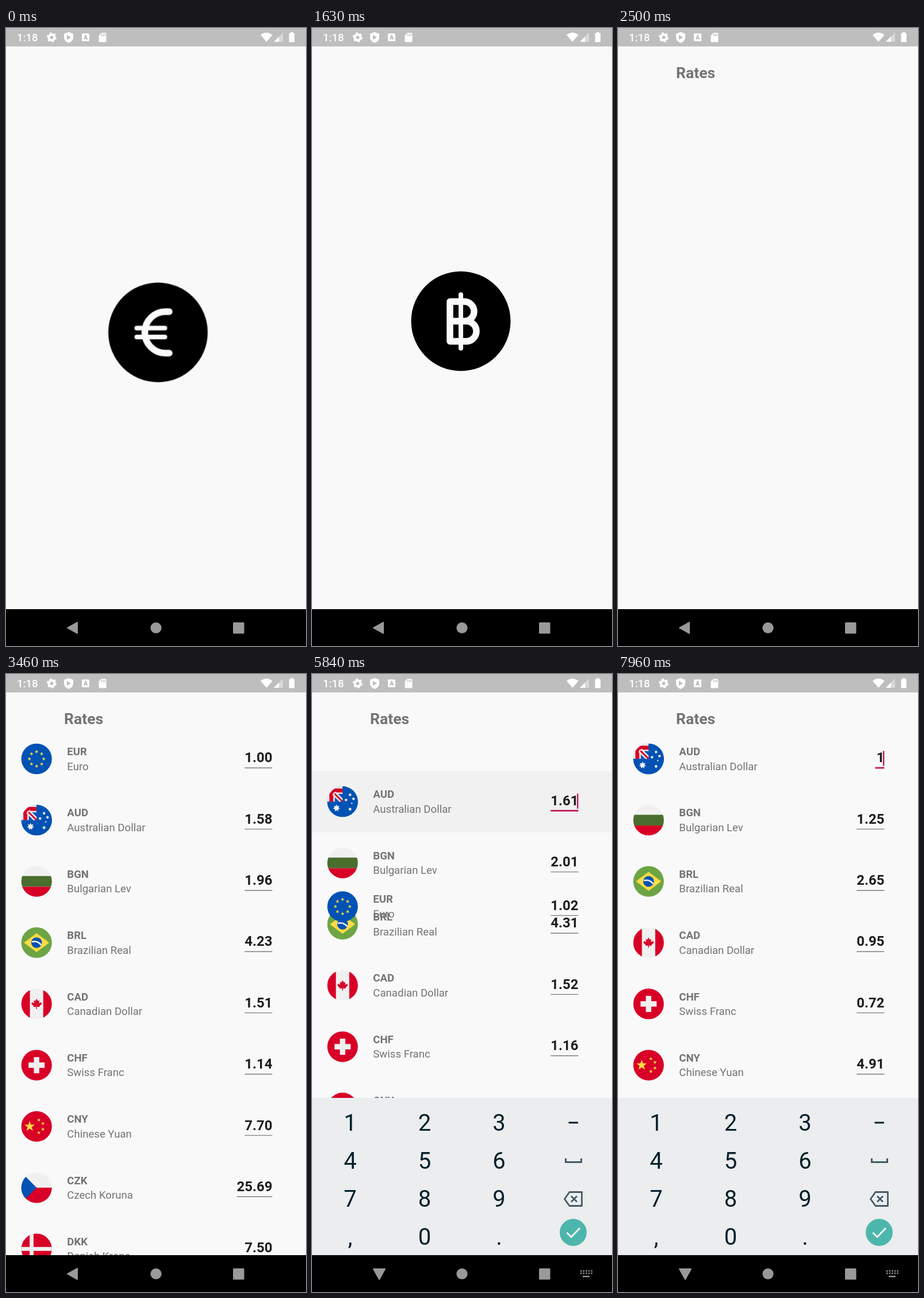
Write an HTML page that moves like this. It is 522 px wide and 1073 px high and loops after 8000 ms.

```html
<!DOCTYPE html>
<html lang="en">
<head>
<meta charset="utf-8">
<title>Currency rates</title>
<style>
html, body { margin: 0; width: 100%; height: 100%; overflow: hidden; background: #000; }
#stage { position: relative; width: 522px; height: 1073px; overflow: hidden; background: #000; }
.layer, .layer > svg { position: absolute; left: 0; top: 0; width: 522px; height: 1073px; }
#imeArea { height: 1009px; overflow: hidden; }
text { font-family: Roboto, sans-serif; }

.anim { animation: 8s linear infinite; }
#splash { animation-name: leave; }
#dim { animation-name: dim; }
#coin { animation-name: drift; }
#face { animation-name: flip; }
#euro { animation-name: first; }
#dollar { animation-name: second; }
#baht { animation-name: third; }
#main { animation-name: enter, reveal; }
#list { animation-name: appear; }
.row { animation-name: shift; }
#ripple { animation-name: ripple; }
#ime { animation-name: raise; }
#navBack { animation-name: navBack; }
#navIme { animation-name: navIme; }
#euro, #dollar, #baht, #navBack, #navIme { animation-timing-function: step-end; }

@keyframes leave {
  0%, 23.575% { transform: none; animation-timing-function: cubic-bezier(.4,0,.2,1); }
  28.575%, 100% { transform: translateY(-21.5px); }
}
@keyframes dim { 0%, 23.575% { opacity: 0; } 24.8%, 100% { opacity: .1; } }
@keyframes drift {
  0% { transform: translate(264.5px, 528.5px); animation-timing-function: ease-in-out; }
  20.375%, 100% { transform: translate(259px, 509px); }
}
@keyframes flip {
  0%, 4.875%, 11.75% { transform: scaleX(1); animation-timing-function: ease-in; }
  6.75%, 13.625% { transform: scaleX(0); animation-timing-function: ease-out; }
  8.625%, 15.5%, 100% { transform: scaleX(1); }
}
@keyframes first { 0% { opacity: 1; } 6.75%, 100% { opacity: 0; } }
@keyframes second { 0% { opacity: 0; } 6.75% { opacity: 1; } 13.625%, 100% { opacity: 0; } }
@keyframes third { 0% { opacity: 0; } 13.625%, 100% { opacity: 1; } }
@keyframes enter {
  0%, 23.575% { transform: translateY(44px); animation-timing-function: cubic-bezier(.4,0,.2,1); }
  28.575%, 100% { transform: none; }
}
@keyframes reveal {
  0%, 23.574% { clip-path: inset(100% 0 0 0); }
  23.575% { clip-path: inset(95.9% 0 0 0); animation-timing-function: cubic-bezier(.3,0,.8,.15); }
  24.408% { clip-path: inset(57.54% 0 0 0); animation-timing-function: cubic-bezier(.05,.7,.1,1); }
  28.575%, 100% { clip-path: inset(0 0 0 0); }
}
@keyframes appear { 0%, 31.875% { opacity: 0; } 33.1%, 100% { opacity: 1; } }
@keyframes shift {
  0%, 71.875% { transform: translateY(var(--from)); animation-timing-function: cubic-bezier(.37,0,.63,1); }
  74.94%, 100% { transform: translateY(var(--to)); }
}
@keyframes ripple {
  0%, 65.63% { opacity: 0; }
  67.5%, 73.2% { opacity: .032; }
  75.5%, 100% { opacity: 0; }
}
@keyframes raise {
  0%, 67.5% { transform: translateY(60px); opacity: 0; animation-timing-function: ease-out; }
  69.5%, 100% { transform: none; opacity: 1; }
}
@keyframes navBack { 0% { opacity: 1; } 67.5%, 100% { opacity: 0; } }
@keyframes navIme { 0% { opacity: 0; } 67.5%, 100% { opacity: 1; } }

#face path { fill: none; stroke: #fafafa; stroke-linecap: round; stroke-linejoin: round; }
.thick { stroke-width: 11.5; }
.thin { stroke-width: 8; }
.label { fill: #737373; font-size: 18.6px; }
.code { font-weight: 700; }
.rate { fill: #1c1c1c; font-size: 23.93px; font-weight: 700; text-anchor: end; }
.rule { stroke: #7d7c84; stroke-width: 1.4; }
.focus .rule { stroke: #c2185b; stroke-width: 2.7; }
.key { fill: #06202b; font-size: 40px; text-anchor: middle; }
</style>
</head>
<body>
<div id="stage">
  <div class="layer"><svg fill="#999">
    <path id="navBack" class="anim" d="M107 1041.5 124 1032V1051Z" stroke="#999" stroke-width="2" stroke-linejoin="round"/>
    <circle cx="261" cy="1041.5" r="9.6"/>
    <rect x="395" y="1032" width="19.5" height="19.5" rx="1.5"/>
    <g id="navIme" class="anim">
      <path d="M107 1033H127L117 1051Z" stroke="#999" stroke-width="2" stroke-linejoin="round"/>
      <path d="M467 1036.5H488M467 1040.5H488" stroke="#999" stroke-width="2.4" stroke-dasharray="2.4 2.2"/>
      <path d="M471 1046H483" stroke="#999" stroke-width="2.4"/>
    </g>
  </svg></div>

  <div id="splash" class="layer anim"><svg>
    <rect width="522" height="1009" fill="#f9f9fa"/>
    <rect width="522" height="32" fill="#bebebe"/>
    <g id="coin" class="anim"><g id="face" class="anim">
      <circle r="86.5"/>
      <g id="euro" class="anim">
        <path class="thick" d="M19.5-36H13A36 36 0 0 0 13 36H19.5"/>
        <path class="thin" d="M-37-7.5H12M-37 8H12"/>
      </g>
      <g id="dollar" class="anim">
        <path class="thick" d="M23-20C19-40-22-40-22-18C-22 4 24-4 24 18C24 40-20 40-24 20"/>
        <path class="thin" d="M0-47V47"/>
      </g>
      <g id="baht" class="anim">
        <path class="thick" d="M-19-34H6A17 17 0 0 1 6 0H9.500A17.500 17.500 0 0 1 9.500 35H-19ZM-19 0H9"/>
        <path class="thin" d="M0-46V47"/>
      </g>
    </g></g>
    <rect id="dim" class="anim" width="522" height="1009"/>
  </svg></div>

  <div id="main" class="layer anim"><svg>
    <clipPath id="page"><rect width="522" height="1009"/></clipPath>
    <clipPath id="disc"><circle r="26.6"/></clipPath>
    <g clip-path="url(#page)">
      <rect width="522" height="1009" fill="#f9f9fa"/>
      <text x="101" y="87" font-size="26.6" font-weight="700" fill="#737373">Rates</text>
      <g id="list" class="anim"></g>
      <rect width="522" height="32" fill="#bebebe"/>
    </g>
  </svg></div>

  <div id="imeArea" class="layer"><svg>
    <g id="ime" class="anim">
      <rect y="736" width="522" height="273" fill="#ebedee"/>
      <g id="keys"></g>
      <g fill="none" stroke="#455a64" stroke-width="3">
        <path d="M446.500 779H463" stroke="#06202b"/>
        <path d="M441.500 841V847.500H468.500V841"/>
        <path d="M448 899.500H469.500V923.500H448L439.500 911.500ZM451 906.500 461 916.500M461 906.500 451 916.500" stroke-width="2.8" stroke-linejoin="round"/>
      </g>
      <circle cx="454.500" cy="969.500" r="23.500" fill="#4db6ac"/>
      <path d="M443.500 970 451 977.500 466 962" fill="none" stroke="#fff" stroke-width="2.8"/>
    </g>
  </svg></div>

  <div class="layer"><svg fill="#fff">
    <text x="19" y="23" font-size="18.600" font-weight="500">1:18</text>
    <g fill="none" stroke="#fff">
      <circle cx="79.500" cy="16.300" r="4.900" stroke-width="4"/>
      <circle cx="79.500" cy="16.300" r="7.300" stroke-width="2.600" stroke-dasharray="3.800 3.845"/>
    </g>
    <path fill-rule="evenodd" d="M109 7 117 10V16C117 21 113.500 24.500 109 26C104.500 24.500 101 21 101 16V10ZM106 12V20.500L113 16.200Z"/>
    <rect x="132" y="9.500" width="13" height="13.500" rx="1.500"/>
    <text x="138.500" y="20" font-size="10" font-weight="700" text-anchor="middle" fill="#aaa">A</text>
    <path d="M166 8.500H173Q174.500 8.500 174.500 10V23Q174.500 24.500 173 24.500H163Q161.500 24.500 161.500 23V13Z"/>
    <path d="M166.500 10.500V14M169.500 10.500V14M172.200 10.500V14" stroke="#bebebe" stroke-width="1.500"/>
    <path d="M443 12Q453 4 463.500 12L453.200 24Z"/>
    <path d="M482 8V24H466Z" opacity=".4"/>
    <path d="M475 15V24H466Z"/>
    <path d="M495 7H499.500V9H502V24.500H492.500V9H495Z"/>
  </svg></div>
</div>

<script>
const LOOP = 8000, ROW = 106.35, TOP = 147.4, RIGHT = 463.4;
const BLUE = '#0052b4', RED = '#d80027', WHITE = '#f0f0f0', GOLD = '#ffda44';

const box = (x, y, w, h, fill) => `<rect x="${x}" y="${y}" width="${w}" height="${h}" fill="${fill}"/>`;
const full = fill => box(-27, -27, 54, 54, fill);
const path = (d, fill) => `<path d="${d}" fill="${fill}"/>`;
const star = (x, y, r, fill, tips = 5) => {
  const points = Array.from({ length: tips * 2 }, (_, k) => {
    const a = k * Math.PI / tips, q = k % 2 ? r * (tips > 5 ? .55 : .4) : r;
    return `${(x + q * Math.sin(a)).toFixed(2)},${(y - q * Math.cos(a)).toFixed(2)}`;
  });
  return `<polygon points="${points.join(' ')}" fill="${fill}"/>`;
};
const ring = Array.from({ length: 8 }, (_, k) =>
  star(12.5 * Math.sin(k * Math.PI / 4), -12.5 * Math.cos(k * Math.PI / 4), 3.4, GOLD)).join('');
const halfLeaf = 'M0-9 2.500-5 5-6 4-1 8-3 9 0 5 4 5 5.500 .8 5V9H0Z';

const currencies = [
  ['EUR', 'Euro', full(BLUE) + ring],
  ['AUD', 'Australian Dollar', full(BLUE) + box(-27, -27, 27, 27, WHITE) +
    path('M-23 0V-23H0V-16H-16V0Z', RED) + box(-13.5, -13.5, 13.5, 13.5, BLUE) +
    `<path d="M-15-15 1 1" stroke="${WHITE}" stroke-width="8"/><path d="M-14-14 0 0" stroke="${RED}" stroke-width="3"/>` +
    box(0, -27, 27, 54, BLUE) + box(-27, 0, 27, 27, BLUE) +
    star(-10.5, 11, 6.3, WHITE, 7) + star(13, -12, 3, WHITE, 7) + star(6, -3, 3, WHITE, 7) +
    star(19, -5, 3, WHITE, 7) + star(13, 13, 3.2, WHITE, 7) + star(16, 3, 2, WHITE)],
  ['BGN', 'Bulgarian Lev', full(WHITE) + box(-27, -9.3, 54, 18.6, '#496e2d') + box(-27, 9.3, 54, 18, RED)],
  ['BRL', 'Brazilian Real', full('#6da544') + path('M-22 0 0-16.500 22 0 0 16.500Z', GOLD) +
    `<circle r="9.3" fill="${BLUE}"/><path d="M-8.500-1.500Q2-4 8 4" fill="none" stroke="${WHITE}" stroke-width="2.6"/>`],
  ['CAD', 'Canadian Dollar', full(WHITE) + box(-27, -27, 15.4, 54, RED) + box(11.6, -27, 15.4, 54, RED) +
    path(halfLeaf, RED) + `<g transform="scale(-1 1)">${path(halfLeaf, RED)}</g>`],
  ['CHF', 'Swiss Franc', full(RED) + box(-14, -4.7, 28, 9.4, WHITE) + box(-4.7, -14, 9.4, 28, WHITE)],
  ['CNY', 'Chinese Yuan', full(RED) + star(-12, 0, 9.5, GOLD) +
    [[4, -11], [11, -5], [11, 5], [4, 11]].map(([x, y]) => star(x, y, 3.4, GOLD)).join('')],
  ['CZK', 'Czech Koruna', full(WHITE) + box(-27, 0, 54, 27, RED) + path('M-27-27-19-19 0 0-19 19-27 27Z', BLUE)],
  ['DKK', 'Danish Krone', full(RED) + box(-12, -27, 6.7, 54, WHITE) + box(-27, -3.4, 54, 6.8, WHITE)]
];

// Start time and the rates shown from then on, in list order
const updates = [
  [0, '1.00 1.59 1.96 4.24 1.52 1.14 7.73 25.74 7.48'],
  [3380, '1.00 1.58 1.96 4.23 1.51 1.14 7.70 25.69 7.50'],
  [4210, '1.00 1.59 1.96 4.26 1.51 1.13 7.68 25.87 7.47'],
  [5000, '1.00 1.60 1.96 4.25 1.50 1.14 7.66 26.02 7.46'],
  [5750, '1.02 1.61 2.01 4.31 1.52 1.16 7.91 26.30 7.61'],
  [6600, '1.02 1.6 2.00 4.24 1.52 1.15 7.86 26.12 7.55'],
  [6980, '0.64 1. 1.25 2.66 0.95 0.72 4.92 16.30 4.72'],
  [7560, '0.64 1 1.25 2.65 0.95 0.72 4.91 16.28 4.71']
].map(([start, rates]) => ({ start, rates: rates.split(' ') }));

const FOCUS = 5500, BLINK = 415;
const cursorResets = [FOCUS, 6600, 6980, 7560];

const rowMarkup = ([code, name, flag], i) => {
  const y = slot => `${TOP + slot * ROW}px`;
  const target = i ? i - 1 : currencies.length - 1;
  const ripple = code === 'AUD' ? '<rect id="ripple" class="anim" y="-53.2" width="522" height="106.4"/>' : '';
  return `<g class="row anim" style="--from:${y(i)};--to:${y(target)}">${ripple}
    <g transform="translate(53.2)"><g clip-path="url(#disc)">${flag}</g></g>
    <text class="label code" x="106.3" y="-6.3">${code}</text>
    <text class="label" x="106.3" y="19.3">${name}</text>
    <text class="rate" x="${RIGHT}" y="6"></text>
    <line class="rule" x2="${RIGHT}" y1="15.6" y2="15.6"/>
    ${ripple && '<rect class="cursor" x="461" y="-14" width="2.4" height="26" fill="#c2185b"/>'}</g>`;
};

// The first row is painted last so that it passes over the others
const list = document.getElementById('list');
const markup = currencies.map(rowMarkup);
list.innerHTML = [...markup.slice(1), markup[0]].join('');
const rows = [...list.children];
rows.unshift(rows.pop());

document.getElementById('keys').innerHTML = ['123', '456', '789', ',0.'].map((line, r) =>
  [...line].map((ch, c) => `<text class="key" x="${66.5 + c * 129.5}" y="${793 + r * 66}">${ch}</text>`).join('')).join('');

const cursor = list.querySelector('.cursor');
const clock = document.getElementById('dim').getAnimations()[0];
let shown = null;

function showRates(update) {
  rows.forEach((row, i) => {
    const rate = row.querySelector('.rate');
    rate.textContent = update.rates[i];
    row.querySelector('.rule').setAttribute('x1', RIGHT - Math.max(16, rate.getComputedTextLength()));
  });
  shown = update;
}

function draw() {
  const t = (clock.currentTime || 0) % LOOP;
  const update = updates.findLast(u => u.start <= t);
  if (update !== shown) showRates(update);
  const reset = cursorResets.findLast(start => start <= t);
  rows[1].classList.toggle('focus', t >= FOCUS);
  cursor.style.opacity = reset !== undefined && Math.floor((t - reset) / BLINK) % 2 === 0 ? 1 : 0;
  requestAnimationFrame(draw);
}
draw();
</script>
</body>
</html>
```
